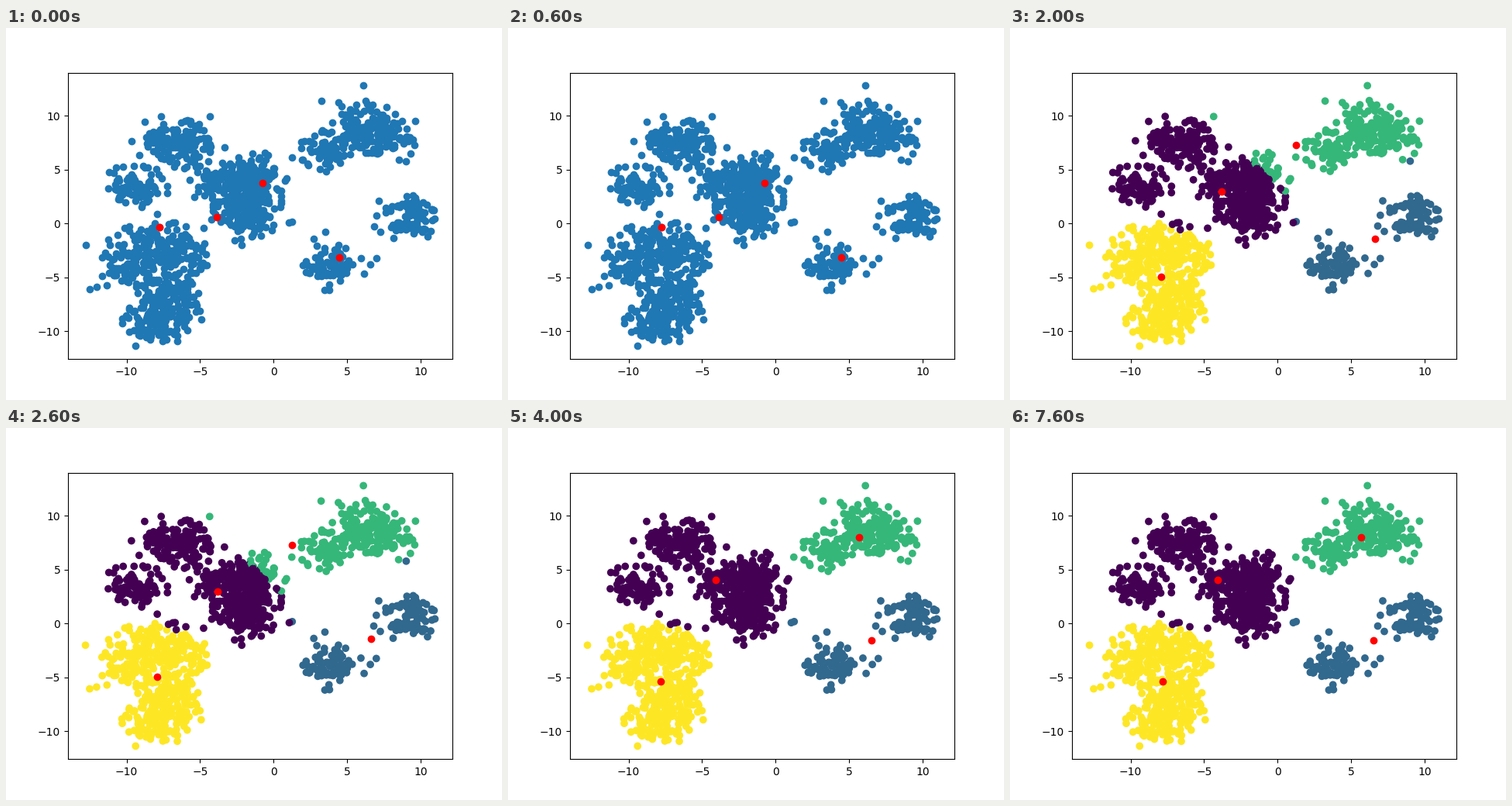
Animation, 640 px wide and 480 px high, one loop 10000 ms. Source, as a matplotlib script:

```python
import matplotlib.pyplot as plt
import numpy as np
from matplotlib.animation import FuncAnimation

SEED = 1
SAMPLES = 1500
CLUSTERS = 19
FRAMES = 10
START = np.array([(-3.85, 0.58), (4.48, -3.13), (-0.77, 3.76), (-7.78, -0.32)])


def make_blobs(samples, clusters, seed):
    """Shuffled unit-variance Gaussian blobs with centres in [-10, 10]."""
    rng = np.random.RandomState(seed)
    centers = rng.uniform(-10, 10, size=(clusters, 2))
    base, extra = divmod(samples, clusters)
    blobs = [rng.normal(c, 1.0, size=(base + (i < extra), 2))
             for i, c in enumerate(centers)]
    order = np.arange(samples)
    rng.shuffle(order)
    return np.concatenate(blobs)[order]


def nearest(points, centroids):
    gaps = points[:, None] - centroids
    return (gaps ** 2).sum(axis=2).argmin(axis=1)


def k_means(points, centroids, steps):
    """Centroids and labels after each of the first steps."""
    history = []
    for _ in range(steps):
        labels = nearest(points, centroids)
        history.append((centroids, labels))
        centroids = np.array([points[labels == k].mean(axis=0)
                              for k in range(len(centroids))])
    return history


points = make_blobs(SAMPLES, CLUSTERS, SEED)
history = k_means(points, START, 5)
palette = plt.get_cmap("viridis")(np.linspace(0, 1, len(START)))

fig, ax = plt.subplots(figsize=(6.4, 4.8), dpi=100)
dots = ax.scatter(*points.T, c="C0")
marks = ax.scatter(*START.T, c="red")


def update(frame):
    centroids, labels = history[min(frame, len(history) - 1)]
    dots.set_color("C0" if frame == 0 else palette[labels])
    marks.set_offsets(centroids)
    return dots, marks


anim = FuncAnimation(fig, update, frames=FRAMES, interval=1000,
                     repeat=True, repeat_delay=0)
plt.show()
```
